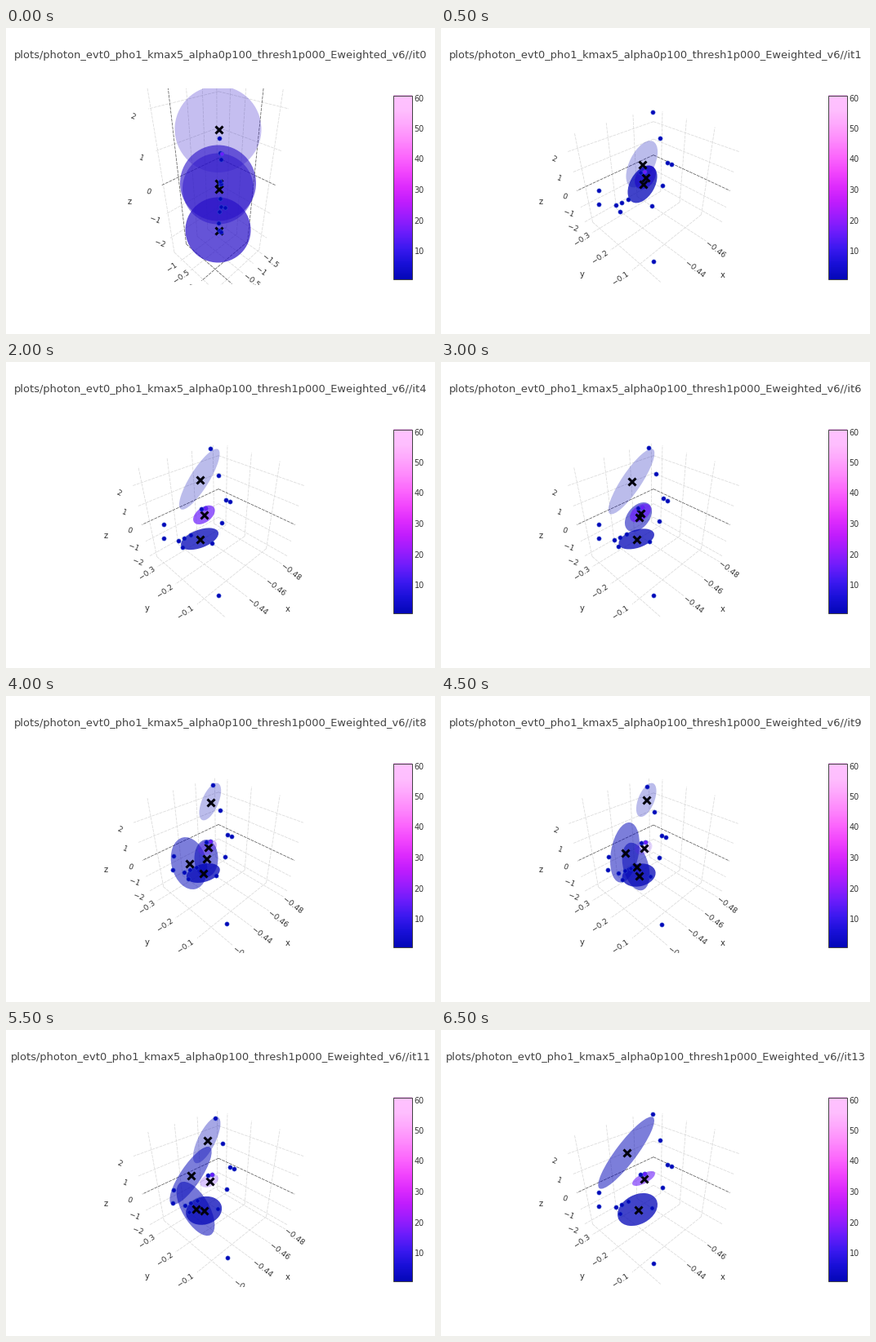
Write a matplotlib script that moves like this. It is 525x375 px and loops after 7000 ms.

```python
import numpy as np
import matplotlib.pyplot as plt
from matplotlib.animation import FuncAnimation
from matplotlib.colors import LinearSegmentedColormap
from matplotlib.patches import Ellipse, Rectangle

W, H, DPI = 525, 375, 100
PT = 72 / DPI                      # points per pixel
INK, TICK_INK, GRID_INK, ZERO_INK = "#444444", "#333333", "#d9d9d9", "#5a5a5a"
BLUE, INDIGO, VIOLET = "#0508b8", "#2a12c8", "#6b1cfb"
FRAMES = 14

plt.rcParams["font.family"] = "DejaVu Sans"
fig = plt.figure(figsize=(W / DPI, H / DPI), dpi=DPI, facecolor="white")


def pixel_axes(left, top, right, bottom):
    ax = fig.add_axes([left / W, 1 - bottom / H, (right - left) / W, (bottom - top) / H])
    ax.set_xlim(left, right)
    ax.set_ylim(bottom, top)
    ax.axis("off")
    return ax


page = pixel_axes(0, 0, W, H)
scene = pixel_axes(60, 74, 462, 315)
title = page.text(262.5, 37, "", size=13 * PT, color=INK, ha="center", va="baseline")


def draw_colorbar():
    stops = ["#0508b8", "#1910d8", "#3c19f0", "#6b1cfb", "#981cfd", "#bf1cfd", "#dd2bfd",
             "#f246fe", "#fc67fd", "#fe88fc", "#fea5fd", "#febefe", "#fec3fe"]
    ramp = LinearSegmentedColormap.from_list("ramp", stops)
    page.imshow(np.linspace(1, 0, 225)[:, None], cmap=ramp, extent=(474, 496.5, 308, 82),
                aspect="auto", interpolation="bilinear")
    page.set_xlim(0, W)
    page.set_ylim(H, 0)
    page.add_patch(Rectangle((474, 82.5), 22.5, 225, fill=False, ec=INK, lw=PT))
    for v in range(10, 61, 10):
        page.text(499.5, 273 - 3.75 * (v - 10), str(v), size=9.6 * PT, color=TICK_INK,
                  va="center_baseline")


def data_range(n):
    """Lower and upper corner of the data box at iteration n."""
    if n == 0:
        return np.array([-1.57, -1.42, -2.73]), np.array([0.56, 0.70, 2.615])
    x_low = np.interp(n, (1, 3, 6, 9, 13), (-.4778, -.4873, -.4822, -.4850, -.4778))
    x_high = -.4075 if 7 <= n <= 11 else -.4143
    swell = np.interp(n, (7, 8, 10, 12), (0, .6, 1, 0))
    return (np.array([x_low, -.3415, -2.3 + .09 * swell]),
            np.array([x_high, -.0165, 2.7 + .26 * swell]))


class Box:
    """Perspective view of a data box from the (1, 1, 1) direction."""

    def __init__(self, n):
        self.lo, self.hi = data_range(n)
        self.span = self.hi - self.lo
        self.size = np.ones(3) if n else self.span / np.cbrt(self.span.prod())

    def project(self, p):
        x, y, z = ((np.asarray(p) - self.lo) / self.span - 0.5) * self.size
        depth = 1.25 * 3 ** 0.5 - (x + y + z) / 3 ** 0.5
        k = 120 / np.tan(np.pi / 8) / depth
        return 260 + k * (y - x) / 2 ** 0.5, 195 - k * (2 * z - x - y) / 6 ** 0.5, depth


def label(x, y, s, angle=0, size=9.2):
    scene.text(x, y, s, size=size * PT, color=TICK_INK, ha="center", va="center",
               rotation=angle, clip_on=True)


def draw_grid(box, n):
    steps = (0.02, 0.1, 1) if n else (0.5, 0.5, 1)
    offsets = [(11.5, 11), (-13, 9), (-15.5, 8)]
    angles = [-38, 34, -22]
    for axis, step in enumerate(steps):
        first, last = np.ceil(box.lo[axis] / step), np.floor(box.hi[axis] / step)
        for i in np.arange(first, last + 1):
            base = box.lo.copy()
            base[axis] = i * step
            for run in {0, 1, 2} - {axis}:
                end = base.copy()
                end[run] = box.hi[run]
                (xa, ya, _), (xb, yb, _) = box.project(base), box.project(end)
                scene.plot([xa, xb], [ya, yb], color=GRID_INK if i else ZERO_INK,
                           lw=0.75 * PT, ls=(0, (5, 1.5)), zorder=1 if i else 1.1)
            side = 1 if axis == 0 else 0
            base[side] = box.hi[side]
            x, y, depth = box.project(base)
            dx, dy = np.array(offsets[axis]) * 2.165 / depth
            text = f"{i * step + 0.0:.4g}".replace("-", "\u2212")
            label(x + dx, y + dy, text, angles[axis])
    if n:
        label(345, 303, "x", size=10)
        label(173, 302, "y", size=10)
    label(122 if n else 151, 213, "z", size=10)


# Hits lie in short rows; ends are offsets from the middle of the unit data box
ROWS = [
    (3, (-.45, -.46, .48), (-.45, -.237, -.017)),
    (2, (-.45, -.178, -.014), (-.25, -.117, -.163)),
    (2, (.5, -.10, .169), (.5, -.138, .008)),
    (3, (.2, -.343, -.296), (.2, -.131, -.104)),
    (2, (.2, -.283, -.348), (-.1, -.124, -.357)),
    (1, (.5, .5, -.142), (.5, .5, -.142)),
    (2, (.05, -.116, .129), (.05, -.062, .161)),
]
HITS = np.concatenate([np.linspace(a, b, count) for count, a, b in ROWS])
HITS = np.array([-.446, -.179, .2]) + HITS * np.array([.0635, .325, 5])

# Key poses by iteration: centre x, y, long and short semi axis, tilt
LOW = {1: (246.5, 191.5, 25, 15, 60), 3: (236, 216.7, 25, 11, 22),
       8: (241.3, 217, 21, 11, 15), 10: (243, 222, 20.5, 16.5, 10),
       13: (240.5, 220, 26, 18, 28)}
CORE = {1: (250, 183, 16, 11, 55), 3: (241.5, 188.5, 15.5, 9, 37),
        6: (244, 185, 14.5, 9, 37), 10: (249, 186, 10, 8, 20),
        13: (248, 182, 15.5, 6, 28)}
MID = {6: (241.5, 190, 20.5, 13.3, 51), 8: (245, 199, 23, 14.5, 90),
       10: (232, 219, 37, 16.5, 120)}
SIDE = {8: (224, 205, 32.5, 21.5, 104), 10: (226, 178.5, 42, 12.5, 56)}


def pose(keys, n):
    return [np.interp(n, list(keys), column) for column in zip(*keys.values())]


def top_pose(n):
    """The top cluster hangs from its upper end and leans more as it grows."""
    reach = np.interp(n, (1, 3, 6, 8, 10, 13), (31, 41, 47.5, 24.5, 19.5, 54.5))
    drop = np.interp(n, (1, 3), (32, 0))
    tilt = 78 - 0.46 * reach
    lean = np.radians(tilt)
    return (259.5 - reach * np.cos(lean), 107 + drop + reach * np.sin(lean),
            reach, 8 + reach / 12 + drop / 7, tilt)


def blob(shape, color, alpha):
    x, y, a, b, tilt = shape
    scene.add_patch(Ellipse((x, y), 2 * a, 2 * b, angle=-tilt, fc=color, ec="none",
                            alpha=alpha, zorder=3))
    scene.plot(x, y, "x", color="#00000c", ms=9 * PT, mew=3 * PT, zorder=4)


def draw_clusters(n):
    if n == 0:
        for y, r, alpha in [(124, 53, .27), (190, 46.5, .62), (197, 43.5, .5), (247.5, 40, .72)]:
            blob((259.5, y, r, r, 0), INDIGO, alpha)
        return
    blob(top_pose(n), BLUE, np.interp(n, (10, 13), (.27, .52)))
    if 7 <= n <= 11:
        blob(pose(SIDE, n), BLUE, .52)
    if 5 <= n <= 11:
        blob(pose(MID, n), BLUE, .55)
    blob(pose(CORE, n), VIOLET, np.interp(n, (6, 8, 10, 13), (.7, .3, .08, .6)))
    blob(pose(LOW, n), BLUE, .76)


def draw(n):
    for artist in [*scene.lines, *scene.texts, *scene.patches]:
        artist.remove()
    title.set_text("plots/photon_evt0_pho1_kmax5_alpha0p100_thresh1p000_"
                   f"Eweighted_v6//it{n}")
    box = Box(n)
    draw_grid(box, n)
    draw_clusters(n)
    for i, hit in enumerate(HITS):
        x, y, _ = box.project(hit)
        color = VIOLET if i == len(HITS) - 1 else BLUE
        scene.plot(x, y, "o", color=color, ms=5.2 * PT, mec="#3050d0", mew=0.5 * PT, zorder=5)
    return []


draw_colorbar()
anim = FuncAnimation(fig, draw, frames=FRAMES, init_func=lambda: draw(0), interval=500,
                     repeat=True, repeat_delay=0, blit=False)
plt.show()
```
